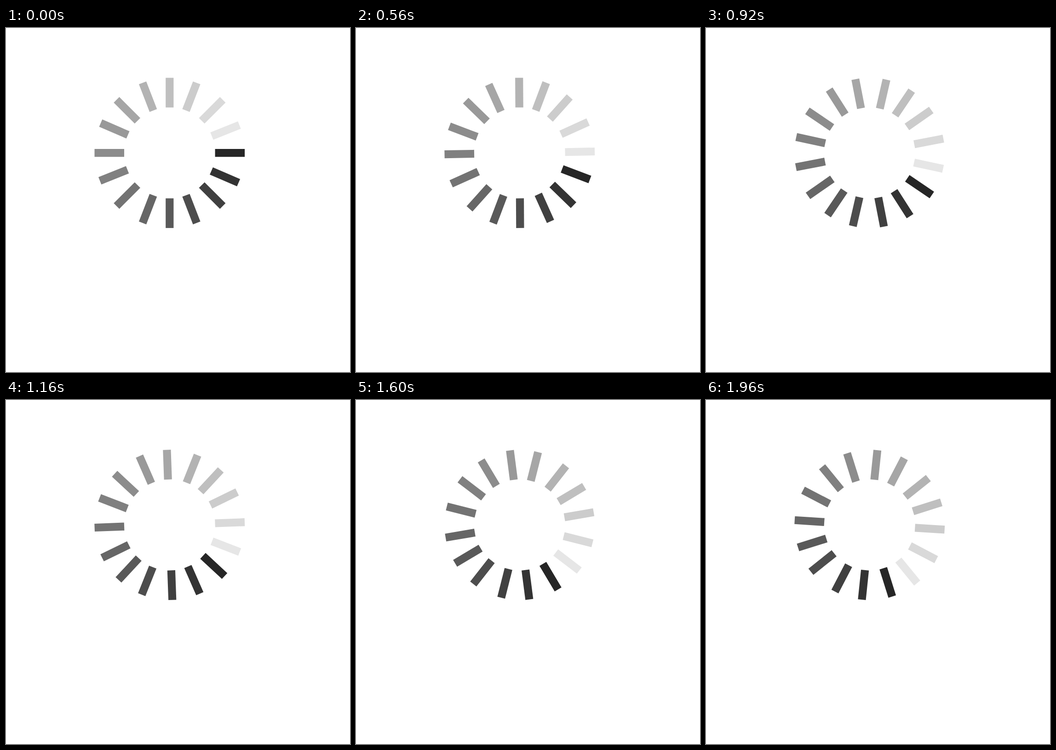
An HTML page that plays this animation: 748x748 px, repeating every 2000 ms.

```html
<!DOCTYPE html>
<html lang="en">
<head>
<meta charset="utf-8">
<title>Spinner</title>
<style>
  html, body { margin: 0; width: 100%; height: 100%; overflow: hidden; background: #fff; }
  svg { display: block; width: 100%; height: 100%; }
</style>
</head>
<body>
<svg viewBox="0 0 748 748"><g id="wheel"></g></svg>
<script>
  const LOOP = 2000, STEP = 40, DEGREES_PER_STEP = 1.48;
  const CENTER = "translate(355.8 271.6)";
  const wheel = document.getElementById("wheel");

  // Opposite spokes share one axis; the spacing is slightly uneven.
  const axes = [0, 23.4, 45, 68.9, 90, 111.1, 135, 158.2];

  for (let i = 0; i < 16; i++) {
    const bar = document.createElementNS("http://www.w3.org/2000/svg", "rect");
    const gray = Math.round(255 * (0.15 + 0.05 * i));
    const attrs = {
      x: 98.8, y: -8.6, width: 64.5, height: 17.2,
      fill: `rgb(${gray},${gray},${gray})`,
      transform: `rotate(${axes[i % 8] + (i < 8 ? 0 : 180)})`
    };
    for (const name in attrs) bar.setAttribute(name, attrs[name]);
    wheel.append(bar);
  }

  function draw(now) {
    const step = Math.floor((now % LOOP) / STEP);
    wheel.setAttribute("transform", `${CENTER} rotate(${step * DEGREES_PER_STEP})`);
  }

  const start = performance.now();
  function tick() {
    draw(performance.now() - start);
    requestAnimationFrame(tick);
  }
  tick();
</script>
</body>
</html>
```
